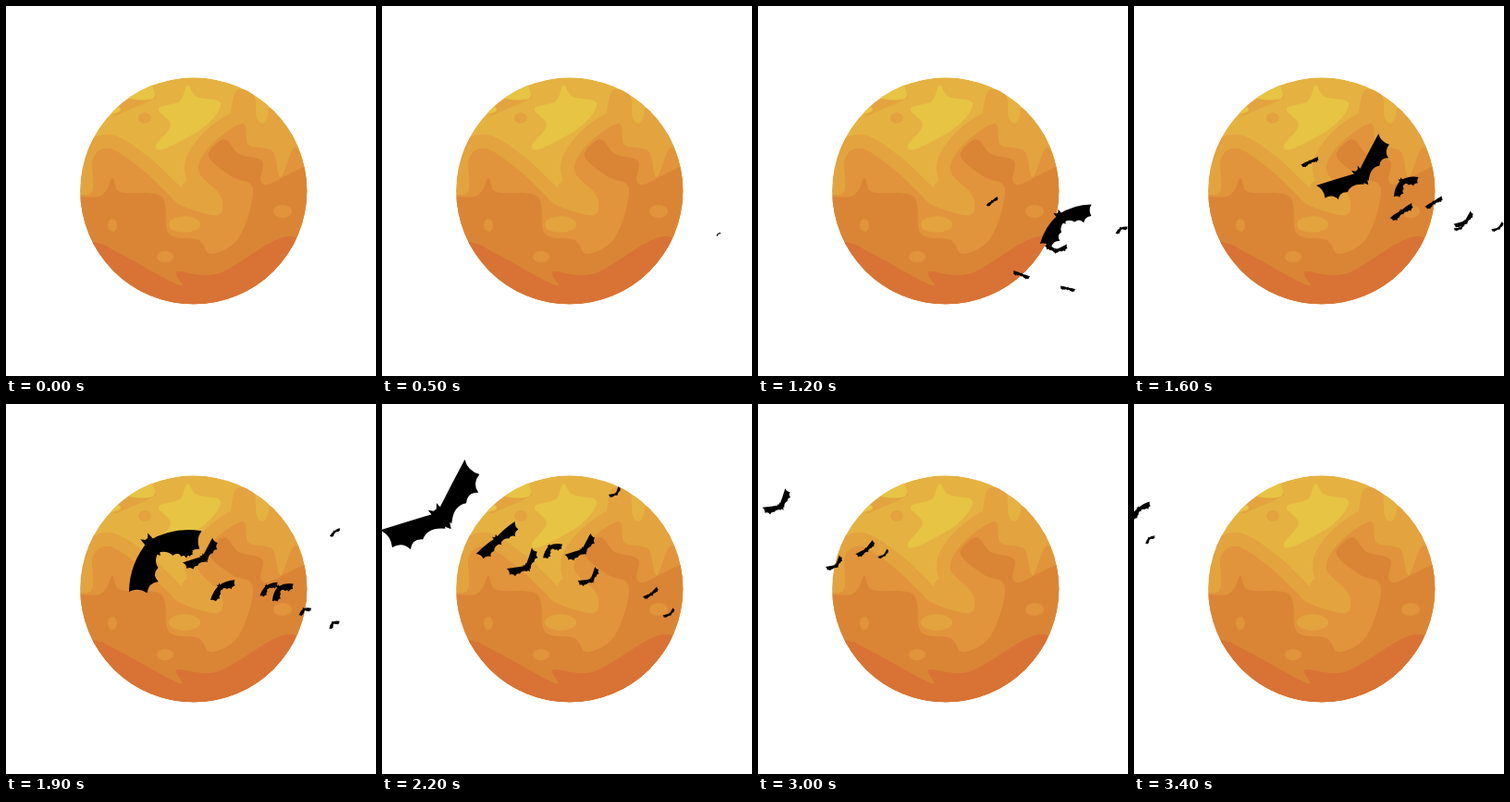
These frames come from a looping animation (400x400 px, 3.5 s). An HTML page with a canvas:

```html
<!DOCTYPE html>
<html>
<head>
<meta charset="utf-8">
<style>
html, body { margin: 0; width: 100%; height: 100%; overflow: hidden; background: #fff; }
canvas { display: block; }
</style>
</head>
<body>
<canvas id="stage" width="400" height="400"></canvas>
<script>
const ctx = document.getElementById('stage').getContext('2d');
const LOOP = 3500, STEP = 100, BEAT = 800;
const YELLOW = '#e7c444', GOLD = '#e5b242', AMBER = '#e3a33f',
      ORANGE = '#e1943b', RUST = '#da8536', RED = '#d87335';

// Closed smooth curve through x, y pairs
function contour(...v) {
  const n = v.length / 2, path = new Path2D();
  const at = i => { const k = (i + n) % n * 2; return [v[k], v[k + 1]]; };
  path.moveTo(v[0], v[1]);
  for (let i = 0; i < n; i++) {
    const [a, b, c, d] = [at(i - 1), at(i), at(i + 1), at(i + 2)];
    path.bezierCurveTo(b[0] + (c[0] - a[0]) / 6, b[1] + (c[1] - a[1]) / 6,
      c[0] - (d[0] - b[0]) / 6, c[1] - (d[1] - b[1]) / 6, c[0], c[1]);
  }
  return path;
}

function spot(...ellipse) {
  const path = new Path2D();
  path.ellipse(...ellipse, 0, 0, 7);
  return path;
}

const disc = spot(202.8, 199.8, 122.5, 122.5);
const haze = contour(116,118, 132,98, 162,98, 136,111);
const crest = contour(118,92, 153,84, 160,99, 138,101);
const star = contour(162,151, 178,129, 165,111, 188,103, 196,86, 206,98, 232,105, 215,130, 172,154);
const shoulder = contour(244,135, 246,97, 256,90, 269,98, 272,124, 290,108, 345,100, 320,170, 262,165);
const mid = contour(60,215, 92,202, 94,165, 112,154, 145,175, 172,200, 190,216, 229,226,
  232,205, 208,178, 222,150, 256,127, 262,150, 288,157, 297,185, 318,160, 345,340, 60,340);
const low = contour(60,220, 103,205, 115,186, 124,201, 168,206, 176,246, 208,253, 222,268,
  252,250, 267,198, 243,184, 219,162, 236,144, 252,160, 277,168, 280,193, 345,180, 345,340, 60,340);
const base = contour(60,255, 98,256, 124,268, 188,302, 185,287, 230,289, 313,250, 345,340, 60,340);

function drawMoon() {
  const fill = (color, ...paths) => {
    ctx.fillStyle = color;
    paths.forEach(p => ctx.fill(p));
  };
  ctx.save();
  ctx.clip(disc);
  fill(GOLD, disc);
  fill(AMBER, haze, shoulder, spot(150, 121, 7, 6), spot(203, 202, 14, 16));
  fill(YELLOW, crest, star, spot(116, 112, 8, 4));
  fill(GOLD, spot(277, 110, 7, 17));
  // The amber band follows the rim of the orange area
  ctx.strokeStyle = AMBER;
  ctx.lineWidth = 30;
  ctx.stroke(mid);
  fill(ORANGE, mid);
  fill(RUST, low);
  fill(RED, base);
  fill(AMBER, spot(193, 236, 17, 9));
  fill(ORANGE, spot(299, 222, 10, 7), spot(115, 237, 5, 7), spot(172, 271, 9, 6));
  ctx.restore();
}

// Moments at which the flight paths are pinned
const TIMES = [800, 1200, 1600, 2200, 2600, 3400];
const bats = [];

// first: index of the first moment; peak: a time when the wings are highest
function fly(first, peak, small, large, ...xy) {
  const keys = [];
  for (let i = 0; i < xy.length; i += 2) keys.push([TIMES[first + i / 2], xy[i], xy[i + 1]]);
  bats.push({ keys, peak, small, large });
}

fly(0, 1500, 25, 66, 379,270, 326,227, 244,182, 62,120);
fly(0, 1000, 5, 17, 316,231, 253,211, 190,168, 181,154, 54,104);
fly(0, 1200, 8, 33, 277,317, 322,264, 289,189, 124,146, -2,95);
fly(0, 1400, 5, 26, 246,328, 285,290, 289,222, 156,176, 49,134);
fly(0, 1400, 6, 17, 297,341, 335,305, 324,212, 226,190, 125,150);
fly(1, 1500, 8, 25, 392,240, 358,233, 217,158, 87,115);
fly(1, 1550, 6, 14, 425,262, 353,240, 291,205, 222,196, 5,113);
fly(2, 1500, 8, 7, 394,240, 311,227, 248,185, 16,145);
fly(2, 1350, 6, 13, 470,200, 253,97, 198,171, -40,165);

// Smooth curve through the keys, straight on beyond both ends
function placeAt(keys, t) {
  const last = keys.length - 1;
  const slope = (i, j) => {
    const a = keys[Math.max(i - 1, 0)], b = keys[Math.min(i + 1, last)];
    return (b[j] - a[j]) / (b[0] - a[0]);
  };
  const next = keys.findIndex(k => k[0] > t);
  return [1, 2].map(j => {
    if (next < 1) {
      const end = next < 0 ? last : 0;
      return keys[end][j] + slope(end, j) * (t - keys[end][0]);
    }
    const a = keys[next - 1], b = keys[next], span = b[0] - a[0];
    const u = (t - a[0]) / span, w = 1 - u;
    return a[j] * w * w * (1 + 2 * u) + b[j] * u * u * (1 + 2 * w)
      + span * u * w * (slope(next - 1, j) * w - slope(next, j) * u);
  });
}

// One wing of unit length, pointing right
function drawWing(bulge) {
  ctx.beginPath();
  ctx.moveTo(-.04, -.05);
  ctx.quadraticCurveTo(.5, bulge, 1, 0);
  ctx.quadraticCurveTo(.85, .12, .88, .32);
  ctx.quadraticCurveTo(.69, .27, .6, .43);
  ctx.quadraticCurveTo(.53, .26, .36, .32);
  ctx.quadraticCurveTo(.24, .14, -.04, .24);
  ctx.fill();
}

function drawBody() {
  ctx.beginPath();
  ctx.moveTo(-.09, -.18);
  ctx.lineTo(-.03, -.11);
  ctx.lineTo(.03, -.11);
  ctx.lineTo(.09, -.18);
  ctx.lineTo(.1, .12);
  ctx.lineTo(0, .3);
  ctx.lineTo(-.1, .12);
  ctx.fill();
}

function drawBat({ keys, peak, small, large }, t) {
  const [x, y] = placeAt(keys, t);
  const speed = placeAt(keys, t + 1)[0] - x;
  const start = keys[0][0], end = keys[keys.length - 1][0];
  const size = Math.max(0, small + (large - small) * (t - start) / (end - start));
  const lift = .07 + .53 * Math.cos((t - peak) / BEAT * 2 * Math.PI);
  ctx.save();
  ctx.translate(x, y);
  ctx.rotate(.7 * Math.tanh(speed * 10));   // bank into the flight direction
  ctx.scale(size, size);
  drawBody();
  for (const side of [-1, 1]) {
    ctx.save();
    ctx.scale(side, 1);
    ctx.rotate(-lift);
    drawWing(.2 * lift - .12);
    ctx.restore();
  }
  ctx.restore();
}

function draw(t) {
  ctx.fillStyle = '#fff';
  ctx.fillRect(0, 0, 400, 400);
  drawMoon();
  ctx.save();
  ctx.beginPath();
  ctx.rect(0, 0, 400, 344);
  ctx.clip();
  ctx.fillStyle = '#000';
  bats.forEach(bat => drawBat(bat, t));
  ctx.restore();
}

const start = performance.now();
function tick() {
  const t = (performance.now() - start) % LOOP;
  draw(Math.floor(t / STEP) * STEP);
  requestAnimationFrame(tick);
}
tick();
</script>
</body>
</html>
```
